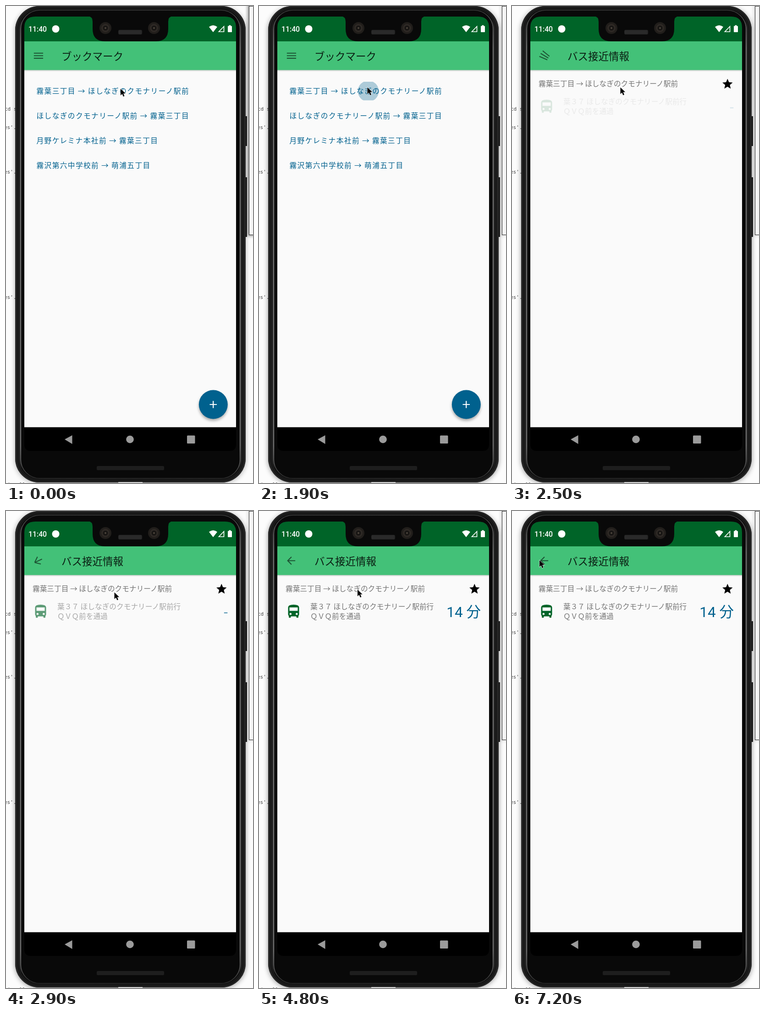
Animation of 539x1039 px, one loop 8 s. Source, as an HTML page:

```html
<!DOCTYPE html>
<html lang="ja">
<head>
<meta charset="utf-8">
<title>Bus app</title>
<style>
html, body { margin: 0; width: 100%; height: 100%; overflow: hidden; background: #fcfcfc; }
svg { display: block; width: 539px; height: 1039px; }
text { font-family: "Noto Sans CJK JP", "Noto Sans CJK", sans-serif; white-space: pre; }
.code text { font: 11px "DejaVu Sans Mono", monospace; fill: #444; }
.clock { font: 500 15.8px Roboto, sans-serif; fill: #fff; }
.title { font-size: 22.5px; fill: #0a1d12; }
.link { font-size: 15.7px; letter-spacing: 1.4px; fill: #00618e; }
.info { font-size: 15.7px; fill: #747474; }
.wait { font-family: Roboto, "Noto Sans CJK JP", sans-serif; font-size: 31.5px; fill: #00618e; }
</style>
</head>
<body>
<svg viewBox="0 0 539 1039" xmlns="http://www.w3.org/2000/svg">
  <defs>
    <filter id="soft" x="-20%" y="-20%" width="140%" height="140%"><feGaussianBlur stdDeviation="6"/></filter>
    <filter id="near" x="-30%" y="-30%" width="160%" height="160%"><feGaussianBlur stdDeviation="3"/></filter>
    <linearGradient id="rim">
      <stop offset="0" stop-color="#161616"/><stop offset=".012" stop-color="#3a3a3a"/>
      <stop offset=".03" stop-color="#0c0c0c"/><stop offset=".97" stop-color="#0c0c0c"/>
      <stop offset=".988" stop-color="#3a3a3a"/><stop offset="1" stop-color="#161616"/>
    </linearGradient>
    <linearGradient id="shine" x1="0" y1="0" x2="0" y2="1">
      <stop offset="0" stop-color="#3c3c3c"/><stop offset=".08" stop-color="#8c8c8c"/>
      <stop offset=".93" stop-color="#8c8c8c"/><stop offset="1" stop-color="#2c2c2c"/>
    </linearGradient>
    <linearGradient id="drop" x1="0" y1="0" x2="0" y2="1">
      <stop offset="0" stop-color="#000" stop-opacity=".2"/><stop offset="1" stop-color="#000" stop-opacity="0"/>
    </linearGradient>
    <clipPath id="screen"><path d="M40 77V47Q40 23 64 23H478Q502 23 502 47V955Q502 969 488 969H54Q40 969 40 955Z"/></clipPath>
    <clipPath id="button"><rect x="58" y="165" width="428" height="40.5" rx="4.5"/></clipPath>
  </defs>

  <rect width="539" height="1039" fill="#fcfcfc"/>
  <g class="code">
    <text x="-3" y="228">cd s</text><text x="-4" y="268">es'.</text>
    <text x="-4" y="365">es'.</text><text x="-4" y="638">es'.</text>
    <text x="3" y="1046">in  ll</text>
  </g>
  <rect id="paneShadow" x="527" y="-4" width="30" height="505" fill="#000" filter="url(#near)"/>
  <rect id="phoneShadow" x="20" y="3" width="503" height="1036" rx="52" fill="#000" filter="url(#soft)"/>
  <rect x="530.5" y=".5" width="20" height="498" fill="#f6f6f6" stroke="#222"/>

  <g id="phone">
    <path d="M522 240h4v65h-4zM522 373h4v130h-4z" fill="#1c1c1c"/>
    <rect x="20" y="0" width="503" height="1038" rx="53" fill="url(#rim)"/>
    <rect x="21.5" y="1.5" width="500" height="1035" rx="51" fill="none" stroke="#262626" stroke-width="3"/>
    <rect x="26" y="5" width="491" height="1028" rx="47" fill="none" stroke="#191919" stroke-width="5"/>
    <rect x="32" y="9" width="479" height="1020" rx="42" fill="none" stroke="url(#shine)" stroke-width="1.6"/>
    <rect x="34" y="10.5" width="475" height="1017" rx="40" fill="#090909"/>
    <rect x="198" y="1002" width="147" height="9" rx="2.5" fill="#1e1e1e"/>
    <rect x="245" y="1037" width="53" height="2" fill="#ddd"/>
  </g>

  <g clip-path="url(#screen)">
    <rect x="40" y="23" width="462" height="55" fill="#006428"/>
    <rect x="40" y="139" width="462" height="779" fill="#fafafa"/>
    <rect x="40" y="139" width="462" height="4" fill="url(#drop)"/>
    <rect x="40" y="77" width="462" height="62.5" fill="#43c178"/>
    <rect x="40" y="917.5" width="462" height="52" fill="#000"/>
  </g>
  <path d="M179 22Q189 23 189 34V50Q189 77 216 77H327Q354 77 354 50V34Q354 23 364 22Z" fill="#090909"/>
  <g id="lenses"></g>
  <rect x="245" y="52" width="52" height="10" rx="3" fill="#262626"/>
  <path d="M247 57H295" stroke="#333" stroke-width="7" stroke-dasharray="1 2"/>

  <text class="clock" x="49" y="56">11:40</text>
  <circle cx="108.5" cy="50" r="8" fill="#fff"/>
  <path d="M443 45.5Q452 38.5 461 45.5L452 57Z" fill="#fff"/>
  <path d="M464.5 56H475.5V44.5Z" fill="none" stroke="#fff" stroke-width="1.7"/>
  <path d="M484 44.5q0-1 1-1h1.700v-1.700h3.600v1.700h1.700q1 0 1 1V56q0 1-1 1h-7q-1 0-1-1Z" fill="#fff"/>

  <path d="M128 944L144.500 935V954Z" fill="#9b9b9b"/>
  <circle cx="270.500" cy="944" r="8.300" fill="#9b9b9b"/>
  <rect x="395" y="935.500" width="17.500" height="17.500" rx="1.500" fill="#9b9b9b"/>

  <path id="menu" fill="none" stroke="#000" stroke-opacity=".56" stroke-width="2.1"/>
  <text id="title" class="title" x="121" y="117.500"></text>

  <g id="listPage">
    <g clip-path="url(#button)"><circle id="ripple" cy="185.500" fill="#00618e" fill-opacity=".31"/></g>
    <g id="links"></g>
    <circle cx="452" cy="872" r="31" fill="#000" opacity=".35" filter="url(#near)"/>
    <circle cx="452.300" cy="868" r="31.500" fill="#00618e"/>
    <path d="M444.500 868H460M452.200 860.300V875.800" stroke="#fff" stroke-width="2.200"/>
  </g>

  <g id="busPage">
    <text id="route" class="info" x="58" y="175"></text>
    <path transform="translate(456.800 156.300) scale(1.124)" d="M12 17.270L18.180 21l-1.640-7.030L22 9.240l-7.190-.610L12 2 9.190 8.630 2 9.240l5.460 4.730L5.820 21z"/>
    <g id="bus">
      <path fill="#006428" d="M63.500 210Q63.500 204 75.500 204T87.500 210V225Q87.500 227 86 228.500V231Q86 232.500 84.500 232.500H83Q81.500 232.500 81.500 231V229.500H69.500V231Q69.500 232.500 68 232.500H66.500Q65 232.500 65 231V228.500Q63.500 227 63.500 225Z"/>
      <rect x="66.500" y="210" width="18" height="7.500" fill="#fafafa"/>
      <circle cx="68.800" cy="224.300" r="2.250" fill="#fafafa"/>
      <circle cx="82.300" cy="224.300" r="2.250" fill="#fafafa"/>
      <text id="line" class="info" x="112" y="214"></text>
      <text class="info" x="112" y="235">ＱＶＱ前を通過</text>
      <text id="dash" class="wait" x="484" y="231" text-anchor="end">-</text>
      <text id="mins" class="wait" x="484" y="231" text-anchor="end">14 分</text>
    </g>
  </g>

  <path id="cursor" d="M1 1.200V15.800L4.500 12.600L6.900 18.300L9.500 17.200L7.100 11.600H11.700Z" fill="#000" stroke="#fff" stroke-width="1.100" paint-order="stroke"/>
</svg>
<script>
const LOOP = 8000, STEP = 100, DP = 1.124;
const $ = id => document.getElementById(id);
const mix = (a, b, k) => a + (b - a) * k;
const clamp = v => Math.max(0, Math.min(1, v));

const stopA = "霧葉三丁目", stopB = "ほしなぎのクモナリーノ駅前";
const trip = (a, b) => `${a} → ${b}`;
$("links").innerHTML = [
  trip(stopA, stopB), trip(stopB, stopA),
  trip("月野ケレミナ本社前", stopA), trip("霧沢第六中学校前", "萌浦五丁目")
].map((s, i) => `<text class="link" x="66.5" y="${191 + 54 * i}">${s}</text>`).join("");
$("route").textContent = trip(stopA, stopB);
$("line").textContent = `葉３７ ${stopB}行`;

$("lenses").innerHTML = [217, 323].map(x =>
  [[13, "#211e1b"], [9, "#2e2925"], [5.5, "#171513"], [2, "#4b443b"]]
    .map(([r, c]) => `<circle cx="${x}" cy="48" r="${r}" fill="${c}"/>`).join("")).join("");

// Keys are [time, ...values]; values between keys are linear.
function track(keys, t) {
  let i = 0;
  while (i < keys.length - 2 && t >= keys[i + 1][0]) i++;
  const a = keys[i], b = keys[i + 1], k = clamp((t - a[0]) / (b[0] - a[0]));
  return a.slice(1).map((v, j) => mix(v, b[j + 1], k));
}

const pointer = [
  [0, 249, 179], [200, 243, 177], [400, 243, 177], [500, 235.5, 176],
  [4300, 235.5, 176], [4600, 229, 174], [4700, 229, 174], [4800, 214, 170],
  [4900, 290, 190], [5000, 425, 204], [5100, 463, 202], [5200, 440, 190],
  [5400, 215, 136], [5600, 56, 102], [5800, 34, 89], [6100, 34, 89],
  [6600, 46, 100], [6700, 46, 100], [7000, 61, 107], [7100, 61, 107], [7200, 59, 106]
];
const morph = [[2400, 0], [2900, .86], [3000, .9], [3100, .9], [3900, 1]];
const rowFade = [[2400, 0], [2900, .62], [3000, .72], [3100, .72], [3500, 1]];

// Three bars that turn into a back arrow as p goes from 0 to 1.
function drawMenu(p) {
  const len = mix(18, 11.3, p) * DP, shaft = mix(18, 16, p) * DP, turn = p * Math.PI / 4;
  const w = len * Math.cos(turn), h = len * Math.sin(turn);
  const off = mix(5, -.7, p) * DP, x = -shaft / 2, cut = p * .7 * DP;
  $("menu").setAttribute("d",
    `M${x + cut} 0h${shaft - 2 * cut}M${x} ${off}l${w} ${h}M${x} ${-off}l${w} ${-h}`);
  $("menu").setAttribute("transform", `translate(70.900 108.300) rotate(${mix(-180, 0, p)})`);
}

function draw(time) {
  const t = Math.floor(time / STEP) * STEP;
  const detail = t >= 2200, focus = t >= 1400;
  $("listPage").style.display = detail ? "none" : "";
  $("busPage").style.display = detail ? "" : "none";
  $("title").textContent = detail ? "バス接近情報" : "ブックマーク";
  $("paneShadow").setAttribute("opacity", focus ? .12 : .4);
  $("phoneShadow").setAttribute("opacity", focus ? .4 : .3);

  const k = Math.max(0, (t - 1870) / 430);
  $("ripple").setAttribute("cx", mix(236, 272, k));
  $("ripple").setAttribute("r", 327 * k);

  drawMenu(track(morph, t)[0]);
  $("bus").setAttribute("opacity", track(rowFade, t)[0]);
  const ready = clamp((t - 3300) / 600);
  $("dash").setAttribute("opacity", 1 - ready);
  $("mins").setAttribute("opacity", ready);

  const [x, y] = track(pointer, t);
  $("cursor").setAttribute("transform", `translate(${x} ${y})`);
}

let start;
function tick(now) {
  if (start === undefined) start = now;
  draw((now - start) % LOOP);
  requestAnimationFrame(tick);
}
draw(0);
requestAnimationFrame(tick);
</script>
</body>
</html>
```
